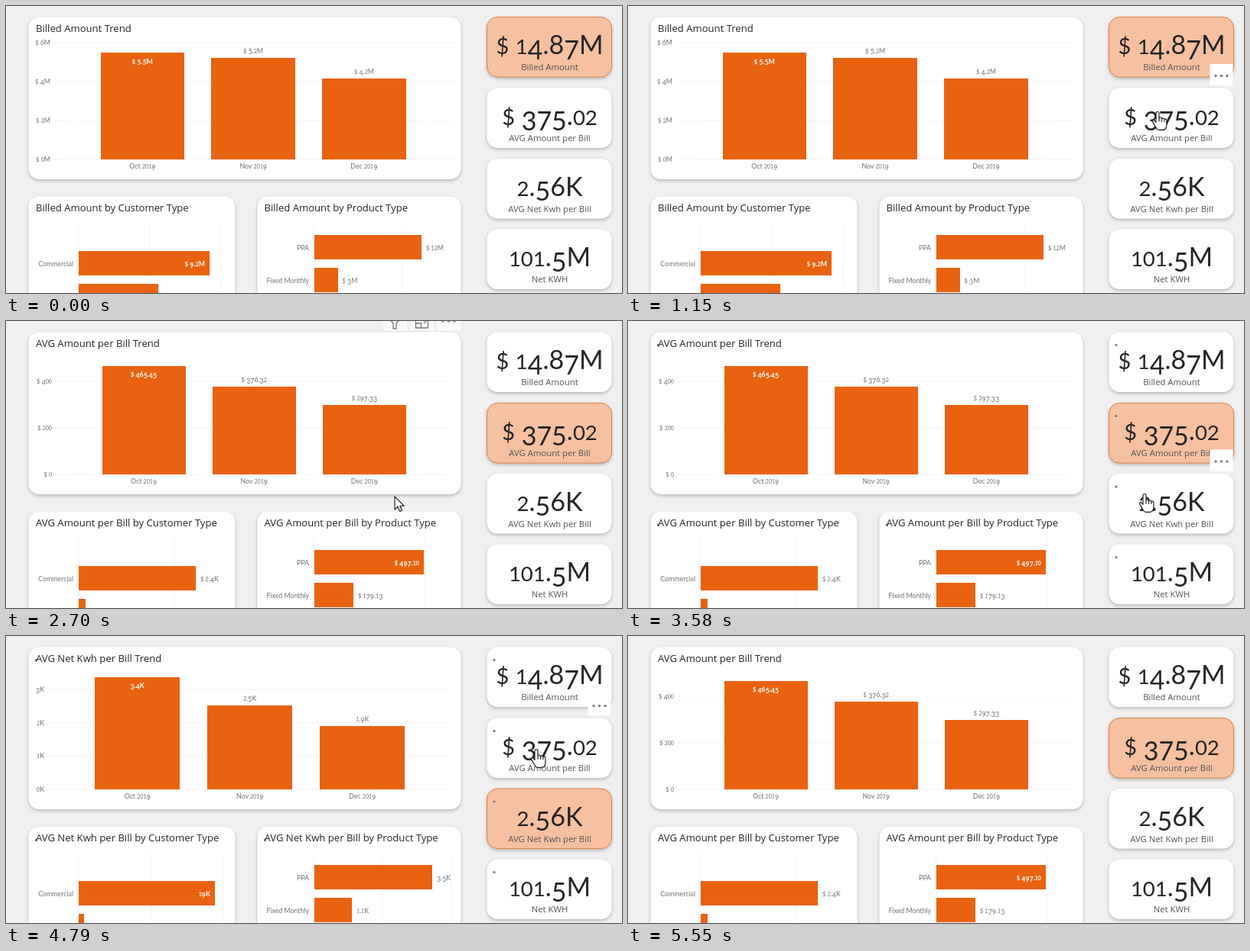
Write an HTML page that moves like this. It is 805 by 376 pixels and loops after 6010 ms.

```html
<!DOCTYPE html>
<html lang="en">
<head>
<meta charset="utf-8">
<title>Billing dashboard</title>
<style>
  html, body { margin: 0; width: 100%; height: 100%; overflow: hidden; background: #f0f0f0; }
  svg { display: block; width: 805px; height: 376px; }
  text { white-space: pre; }
  .ui { font-family: "Open Sans", "Noto Sans", sans-serif; }
  .fig { font-family: Lato, "Open Sans", sans-serif; }
  .panel { fill: #fff; filter: drop-shadow(0 2px 2px rgba(0, 0, 0, .24)); }
  .on { fill: #f7c09f; stroke: #e0823f; }
  .bar { fill: #e96210; shape-rendering: crispEdges; }
  .grid { stroke: #dedede; stroke-dasharray: 1.5 3.5; }
  .tip { filter: drop-shadow(0 1px 5px rgba(0, 0, 0, .25)); }
  .cursor { fill: #fff; stroke: #111; stroke-width: 1.1; stroke-linejoin: round; }
</style>
</head>
<body>
<svg id="stage" viewBox="0 0 805 376"></svg>
<script>
const LOOP = 6010, BASE = 201, HOVER_LAG = 130;
const INK = '#252423', GREY = '#707070';

const CARDS = [
  { y: 14, value: '$ 14.87M', label: 'Billed Amount' },
  { y: 107, value: '$ 375.02', label: 'AVG Amount per Bill' },
  { y: 199.5, value: '2.56K', label: 'AVG Net Kwh per Bill' },
  { y: 292, value: '101.5M', label: 'Net KWH' }
];

const VIEWS = [
  { axis: 58, top: 48, ticks: ['$ 6M', '$ 4M', '$ 2M', '$ 0M'],
    x: 123.5, step: 144.8, w: 109.7, tops: [61, 67.5, 95], values: ['$ 5.5M', '$ 5.2M', '$ 4.2M'],
    custGrid: [187.5, 281], cust: [[266, '$ 9.2M', true], [199]],
    prodGrid: [518], prod: [[543, '$ 12M'], [433.5, '$ 3M']] },
  { axis: 60, top: 79, ticks: ['$ 400', '$ 200', '$ 0'],
    x: 125.5, step: 144.2, w: 109, tops: [58.5, 86, 110], values: ['$ 465.45', '$ 376.32', '$ 297.33'],
    custGrid: [220.5], cust: [[248, '$ 2.4K'], [104]],
    prodGrid: [547.5], prod: [[546, '$ 497.10', true], [454, '$ 179.13']] },
  { axis: 50, top: 70, ticks: ['3K', '2K', '1K', '0K'],
    x: 116, step: 147, w: 111.4, tops: [53.5, 90.5, 118], values: ['3.4K', '2.5K', '1.9K'],
    custGrid: [189.5, 284.5], cust: [[273, '19K', true], [102]],
    prodGrid: [491.5, 582], prod: [[557, '3.5K'], [452, '1.1K']] }
];

// [from ms, value]
const VIEW_STEPS = [[0, 0], [1610, 1], [3650, 2], [4860, 1]];
const LOADING = [[1400, 1610], [3320, 3650], [4580, 4860]];
// [from, to, card, arrow x, arrow y]
const TIPS = [[1740, 2050, 1, 712, 98], [3850, 4110, 2, 696, 190], [5060, 5310, 1, 712, 98]];
// [ms, x, y]
const PATH = [
  [190, 722, 374], [740, 700, 166], [800, 700, 166], [1150, 692, 139],
  [1700, 692, 139], [1780, 611, 128], [1860, 608, 125], [1940, 505, 110],
  [2000, 505, 110], [2240, 128, 60], [2560, 508, 226], [2630, 508, 230],
  [2700, 508, 230], [3130, 690, 256], [3250, 690, 256], [3450, 675, 227],
  [3850, 675, 227], [4260, 693, 149], [5150, 693, 149], [5500, 716, 376]
];

const stage = document.getElementById('stage');

function el(parent, tag, attrs = {}, text) {
  const node = document.createElementNS('http://www.w3.org/2000/svg', tag);
  for (const key in attrs) node.setAttribute(key, attrs[key]);
  if (text !== undefined) node.textContent = text;
  return parent.appendChild(node);
}

const group = parent => el(parent, 'g');
const show = (node, visible) => { node.style.display = visible ? '' : 'none'; };

function rect(parent, x, y, width, height, attrs) {
  return el(parent, 'rect', { x, y, width, height, ...attrs });
}

function dots(parent, x, y) {
  for (let i = -1; i <= 1; i++) el(parent, 'circle', { cx: x + i * 7.5, cy: y, r: 1.7, fill: '#808080' });
}

function uiText(parent, x, y, size, text, attrs) {
  el(parent, 'text', { class: 'ui', x, y, 'font-size': size, fill: INK, ...attrs }, text);
}

// Text with old-style figures: 0-2 near x-height, 3-5, 7 and 9 hanging, a small dollar sign.
function figText(parent, x, y, size, text, attrs) {
  const node = el(parent, 'text', { class: 'fig', x, y, 'font-size': size, fill: GREY, ...attrs });
  let shift = 0;
  for (const run of text.match(/[012]+|[34579]+|\$|[^0-579$]+/g)) {
    const drop = /[34579]/.test(run) ? size * 0.2 : 0;
    const scale = /[012]/.test(run) ? 0.81 : run === '$' ? 0.85 : 1;
    el(node, 'tspan', { dy: drop - shift, 'font-size': size * scale }, run);
    shift = drop;
  }
}

const middle = { 'text-anchor': 'middle' };
const end = { 'text-anchor': 'end' };
const bright = { fill: '#fff', 'font-weight': 700 };

function rows(g, x, y, bars, names, grid) {
  for (const gx of [x, ...grid]) el(g, 'line', { class: 'grid', x1: gx, x2: gx, y1: 283, y2: 376 });
  bars.forEach(([right, label, inside], i) => {
    const top = y + i * 43;
    rect(g, x, top, right - x, 32, { class: 'bar' });
    if (names[i]) figText(g, x - 6.5, top + 20, 8.8, names[i], end);
    if (!label) return;
    if (inside) figText(g, right - 6, top + 20, 8.8, label, { ...end, ...bright });
    else figText(g, right + 6, top + 20, 8.8, label);
  });
}

function buildView(v, i) {
  const g = group(stage), name = CARDS[i].label;
  uiText(g, 39, 34, 13.1, name + ' Trend');
  uiText(g, 39, 269, 13.1, name + ' by Customer Type');
  uiText(g, 337.5, 269, 13.1, name + ' by Product Type');
  v.ticks.forEach((label, n) => {
    const y = v.top + (BASE - v.top) * n / (v.ticks.length - 1);
    el(g, 'line', { class: 'grid', x1: v.axis + 6, x2: 586, y1: y, y2: y });
    figText(g, v.axis, y + 3, 8.8, label, end);
  });
  ['Oct 2019', 'Nov 2019', 'Dec 2019'].forEach((month, n) => {
    const x = v.x + n * v.step, cx = x + v.w / 2, top = v.tops[n];
    rect(g, x, top, v.w, BASE - top, { class: 'bar' });
    figText(g, cx, 213, 8.8, month, middle);
    if (n) figText(g, cx, top - 6, 8.8, v.values[n], middle);
    else figText(g, cx, top + 14.5, 8.8, v.values[n], { ...middle, ...bright });
  });
  rows(g, 94.5, 321, v.cust, ['Commercial'], v.custGrid);
  rows(g, 402.5, 300, v.prod, ['PPA', 'Fixed Monthly'], v.prodGrid);
  return g;
}

function buildCard({ y, value, label }) {
  const box = rect(stage, 628.5, y + 0.5, 163, 78.5, { rx: 14, class: 'panel' });
  figText(stage, 710.5, y + 49, 34, value, { ...middle, fill: INK });
  uiText(stage, 710.5, y + 70, 11.3, label, { ...middle, fill: '#555' });
  return box;
}

function buildCardMenu({ y }) {
  const g = group(stage);
  rect(g, 760.5, y - 31, 30, 28, { fill: '#fff' });
  dots(g, 775.5, y - 15.5);
  return g;
}

function buildTrendMenu() {
  const g = group(stage);
  for (const x of [493, 528, 563]) rect(g, x, -10, 31, 22.5, { fill: '#fbfbfb' });
  const line = { fill: 'none', stroke: '#777', 'stroke-width': 1.3 };
  el(g, 'path', { d: 'M501-3h14l-5 6v7h-4v-7z', ...line });
  el(g, 'path', { d: 'M535.5-6h16v15h-16zM535.5 3h7v6M546 3l4-4', ...line });
  dots(g, 578.5, 0);
  return g;
}

function buildLoading() {
  const g = group(stage);
  for (const { y } of CARDS) el(g, 'circle', { cx: 638, cy: y + 17.5, r: 1.6, fill: '#777' });
  for (const [cx, cy] of [[39.5, 31.5], [39.5, 267], [338.5, 267]])
    el(g, 'circle', { cx, cy, r: 1.6, fill: '#555' });
  return g;
}

function buildTip([, , card, x, y]) {
  const g = group(stage), left = x - 27, top = y - 56;
  el(g, 'path', { class: 'tip', fill: '#fff', d: `M${left} ${top}h200v50h-167l-6 6-6-6h-21z` });
  uiText(g, left + 16, top + 31, 15, CARDS[card].label, { 'font-weight': 600, fill: '#3c3c3c' });
  return g;
}

const cursorPath = d => el(stage, 'path', { class: 'cursor', d });

rect(stage, 0, 0, 805, 376, { fill: '#f0f0f0' });
rect(stage, 29.5, 14.5, 565, 212.5, { rx: 14, class: 'panel' });
rect(stage, 29.5, 249.5, 270, 150, { rx: 14, class: 'panel' });
rect(stage, 328.5, 249.5, 266, 150, { rx: 14, class: 'panel' });
const views = VIEWS.map(buildView);
const cards = CARDS.map(buildCard);
const menus = [...CARDS.map(buildCardMenu), buildTrendMenu()];
const loading = buildLoading();
const tips = TIPS.map(buildTip);
const arrow = cursorPath('M0 0v17l4-3.8 2.7 6.2 2.7-1.2-2.7-6h5.4z');
const hand = cursorPath('M-2 1.5a2 2 0 0 1 4 0v7a1.8 1.8 0 0 1 3.6.6a1.7 1.7 0 0 1 3.3.8' +
  'a1.6 1.6 0 0 1 3 1v5.5c0 4-2 7-5.5 7h-4c-2.5 0-4-2-5.2-4.5l-3.5-6c-.8-2 1.2-3 2.6-1.5l1.7 2z' +
  'M2 8.5v4M5.6 9.1v3.6M8.9 9.9v3');

function cursorAt(t) {
  const next = PATH.findIndex(p => p[0] > t);
  if (next < 1) return null;
  const [t0, x0, y0] = PATH[next - 1], [t1, x1, y1] = PATH[next];
  const k = (1 - Math.cos(Math.PI * (t - t0) / (t1 - t0))) / 2;
  return [x0 + (x1 - x0) * k, y0 + (y1 - y0) * k];
}

// Index of the hovered card, 4 for the trend chart, -1 for nothing.
function hoverAt(pos) {
  if (!pos) return -1;
  const [x, y] = pos;
  if (x > 29 && x < 595 && y > 14 && y < 240) return 4;
  return x > 628 && x < 792 ? CARDS.findIndex(c => y >= c.y && y <= c.y + 80) : -1;
}

function draw(t) {
  const view = VIEW_STEPS.filter(s => s[0] <= t).pop()[1];
  views.forEach((g, i) => show(g, i === view));
  cards.forEach((c, i) => c.classList.toggle('on', i === view));
  show(loading, LOADING.some(([a, b]) => t >= a && t < b));
  tips.forEach((g, i) => show(g, t >= TIPS[i][0] && t < TIPS[i][1]));

  const pos = cursorAt(t), over = hoverAt(pos);
  const hovered = pos ? hoverAt(cursorAt(t - HOVER_LAG)) : -1;
  menus.forEach((g, i) => show(g, i === hovered));

  const onCard = over >= 0 && over < 4;
  show(hand, pos && onCard);
  show(arrow, pos && !onCard);
  if (pos) (onCard ? hand : arrow).setAttribute('transform', `translate(${pos})`);
}

const start = performance.now();
function tick() {
  draw((performance.now() - start) % LOOP);
  requestAnimationFrame(tick);
}
tick();
</script>
</body>
</html>
```
